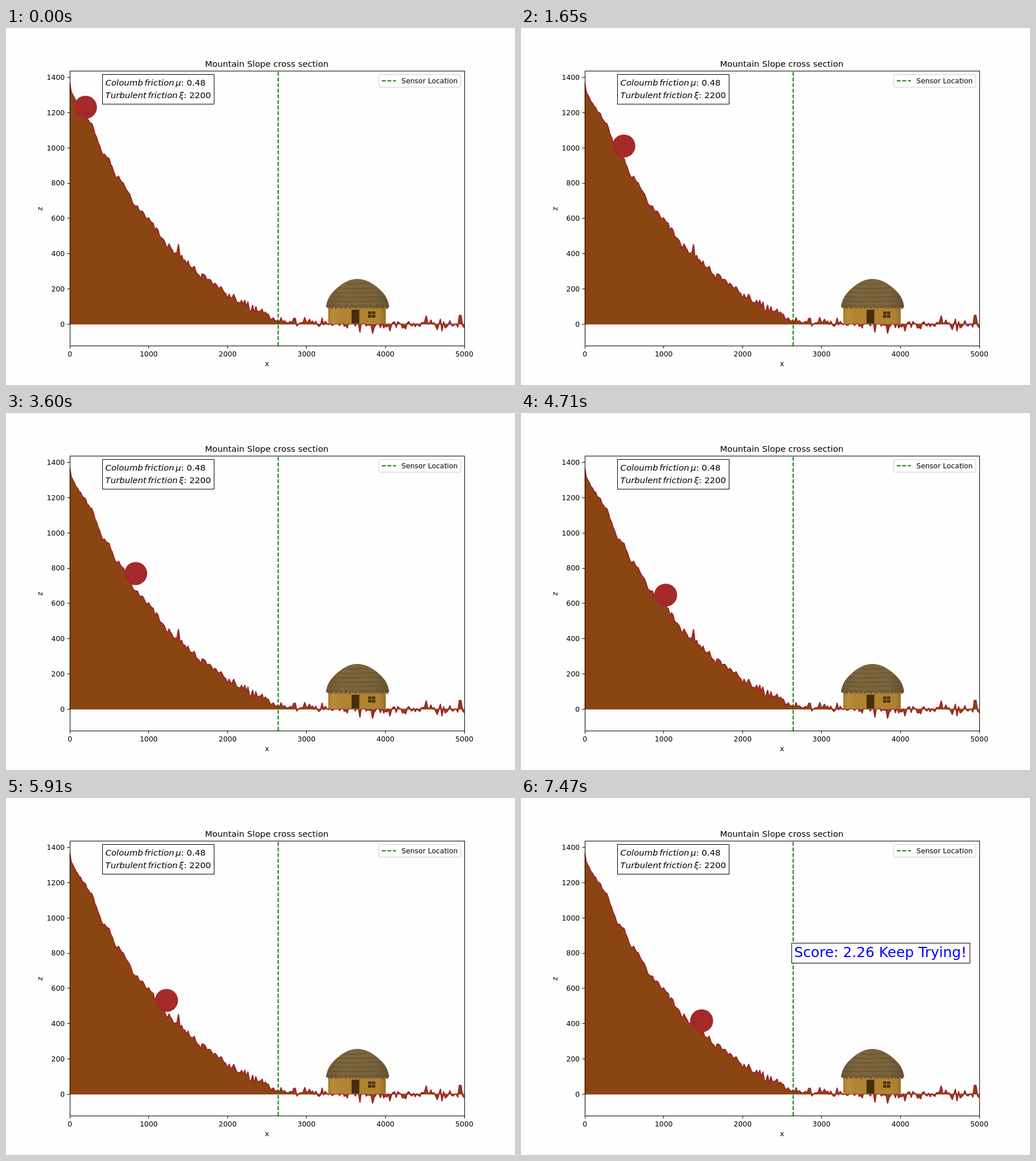
These frames come from a looping animation (894x626 px, 8 s). An HTML page:

```html
<!DOCTYPE html>
<html lang="en">
<head>
<meta charset="utf-8">
<title>Mountain Slope</title>
<style>
html, body { margin: 0; width: 100%; height: 100%; overflow: hidden; background: #fefefe; }
svg { display: block; width: 100vw; height: 100vh; }
text { font: 12.42px "DejaVu Sans", sans-serif; fill: #000; white-space: pre; }
.big { font-size: 14.9px; }
.math { font-kerning: none; }
.math .it { font-style: italic; }
.frame { fill: none; stroke: #000; stroke-width: 1; }
.box { fill: #fff; stroke: #000; }
.sensor { fill: none; stroke: #008000; stroke-width: 1.86; stroke-dasharray: 6.88 2.98; }
#score text { font-size: 24.83px; fill: #00f; }
</style>
</head>
<body>
<svg viewBox="0 0 894 626">
  <defs>
    <clipPath id="plot"><rect x="111.75" y="75.1" width="692.85" height="482"/></clipPath>
    <linearGradient id="wall">
      <stop offset="0" stop-color="#a87b2d"/><stop offset=".08" stop-color="#ba8c3c"/>
      <stop offset=".2" stop-color="#b08432"/><stop offset=".9" stop-color="#ae8230"/>
      <stop offset="1" stop-color="#94702a"/>
    </linearGradient>
    <linearGradient id="thatch">
      <stop offset="0" stop-color="#6d5935"/><stop offset=".25" stop-color="#7d663e"/>
      <stop offset=".75" stop-color="#7a633c"/><stop offset="1" stop-color="#665231"/>
    </linearGradient>
  </defs>
  <g clip-path="url(#plot)">
    <path id="soil" fill="#8b4513" stroke="#8b4513" stroke-width="1.3"/>
    <circle id="ball" r="20.2" fill="#a52a2a"/>
    <path id="ridge" fill="none" stroke="#9f2729" stroke-width="2.2" stroke-linejoin="round"/>
    <path class="sensor" d="M478 557.1V75.1"/>
  </g>
  <g id="hut">
    <rect x="566" y="484" width="101" height="34.6" fill="url(#wall)"/>
    <rect x="607" y="494" width="13.5" height="24" fill="#442e0c"/>
    <rect x="636" y="497" width="12.5" height="11" fill="#4a330f"/>
    <path d="M642.2 497v11M636 502.3h12.5" stroke="#a0772c" stroke-width="1.2"/>
    <path id="roof" fill="url(#thatch)"/>
    <path id="rows" fill="none" stroke="#5f4c2c" stroke-width="1"/>
    <path id="straw" fill="none" stroke="#58462a" stroke-width=".9"/>
  </g>
  <rect class="frame" x="112.5" y="75.5" width="693" height="482"/>
  <g id="axes"></g>
  <text class="big" x="458" y="68" text-anchor="middle">Mountain Slope cross section</text>
  <text x="458.3" y="593" text-anchor="middle">x</text>
  <text transform="translate(63.5 317) rotate(-90)" text-anchor="middle">z</text>
  <rect class="box" x="169.5" y="81.5" width="196" height="52"/>
  <text class="big math" x="174.6" y="101"><tspan class="it">Coloumb</tspan><tspan class="it" dx="2.5">friction</tspan><tspan class="it" dx="2.5">μ</tspan>: 0.48</text>
  <text class="big math" x="174.6" y="123"><tspan class="it">Turbulent</tspan><tspan class="it" dx="2.5">friction</tspan><tspan class="it" dx="2.5">ξ</tspan>: 2200</text>
  <rect x="654.8" y="81.8" width="144" height="22" rx="2.5" fill="#fff" fill-opacity=".8" stroke="#ccc"/>
  <path class="sensor" d="M660 92.5h25"/>
  <text x="694.5" y="97">Sensor Location</text>
  <g id="score">
    <rect class="box" x="475.5" y="254.5" width="313" height="35"/>
    <text x="479.7" y="279.3">Score: 2.26 Keep Trying!</text>
  </g>
</svg>
<script>
const $ = id => document.getElementById(id);
const setPath = (id, d) => $(id).setAttribute("d", d);
const line = pts => "M" + pts.map(p => p.map(v => v.toFixed(1)).join(" ")).join("L");
const LEFT = 111.75, RIGHT = 804.6, BASE = 519.2;
const LOOP = 8000, TICK = 30, END = 7470;

function seeded(seed) {
  return () => {
    seed = (seed * 16807) % 2147483647;
    return seed / 2147483647;
  };
}

// Rough outline of the mountain, and the tallest spikes and dips on it.
const outline = [[111, 96], [118, 122], [151, 171], [168, 217], [182, 231], [192, 259], [205, 271],
  [222, 305], [252, 336], [285, 382], [330, 424], [400, 476], [480, 513], [530, 518], [805, 520]];
const spikes = [[303, 380], [425, 481], [525, 508], [621, 533], [644, 535], [674, 531], [739, 505],
  [766, 531], [796, 504], [799, 504]];

function heightAt(x) {
  const i = outline.findIndex(p => p[0] >= x);
  const [[x0, y0], [x1, y1]] = [outline[i - 1], outline[i]];
  return y0 + (y1 - y0) * (x - x0) / (x1 - x0);
}

function drawLand() {
  const rand = seeded(2640), step = (RIGHT - LEFT) / 250, land = [];
  for (let i = 0; i <= 250; i++) {
    const x = LEFT + i * step;
    const rough = 4 + 6 * Math.min(1, i / 110);
    land.push([x, heightAt(x) + (rand() + rand() - 1) * rough]);
  }
  for (const [x, y] of spikes) land[Math.round((x - LEFT) / step)][1] = y;
  setPath("ridge", line(land));
  setPath("soil", line([[LEFT, BASE], ...land, [RIGHT, BASE]]) + "Z");
}

function drawAxes() {
  const snap = v => Math.floor(v) + 0.5;
  const label = (x, y, anchor, value) =>
    `<text x="${x}" y="${y}" text-anchor="${anchor}">${value}</text>`;
  let out = "";
  for (let v = 0; v <= 5000; v += 1000) {
    const x = LEFT + v * 0.13857;
    out += `<path class="frame" d="M${snap(x + 0.5)} 557.5v4.4"/>` + label(x + 0.4, 576.3, "middle", v);
  }
  for (let v = 0; v <= 1400; v += 200) {
    const y = BASE - v * 0.30893;
    out += `<path class="frame" d="M112.5 ${snap(y)}h-4.9"/>` + label(103.2, y + 4.4, "end", v);
  }
  $("axes").innerHTML = out;
}

function drawRoof() {
  const fringe = [];
  let straw = "", rows = "";
  for (let i = 0; i <= 36; i++) {
    const x = 672 - i * 3;
    fringe.push([x, 489 + (i % 2 ? 4 : 0) + Math.sin(i * 2.3)]);
    straw += `M${x} ${486 + Math.sin(i * 1.7)}l${(i % 3) - 1} 5`;
  }
  for (let i = 0; i < 5; i++) {
    const w = 50 - 1.9 * (4 - i) ** 2;
    rows += `M${617 - w} ${448 + i * 7.7}q${w / 2} 2 ${w} 1t${w} -1`;
  }
  setPath("roof", line(fringe) + "L562 489C564 476 568 469 578 459C592 446 604 440 617 440" +
    "S643 446 656 458C667 468 671 476 673 489Z");
  setPath("straw", straw);
  setPath("rows", rows);
}

// The ball slows a little while the slope under it flattens.
function ballAt(t) {
  const u = 0.0252 * t - 1.9e-7 * t * t;
  return [139.6 + u, 139 + 1.66 * u - 9.7e-7 * u ** 3.4];
}

function render(ms) {
  const t = Math.min(END, Math.floor((ms % LOOP) / TICK) * TICK);
  const [x, y] = ballAt(t);
  $("ball").setAttribute("cx", x.toFixed(2));
  $("ball").setAttribute("cy", y.toFixed(2));
  $("score").setAttribute("visibility", t >= END ? "visible" : "hidden");
}

drawLand();
drawAxes();
drawRoof();
const start = performance.now();
function loop() {
  render(performance.now() - start);
  requestAnimationFrame(loop);
}
loop();
</script>
</body>
</html>
```
